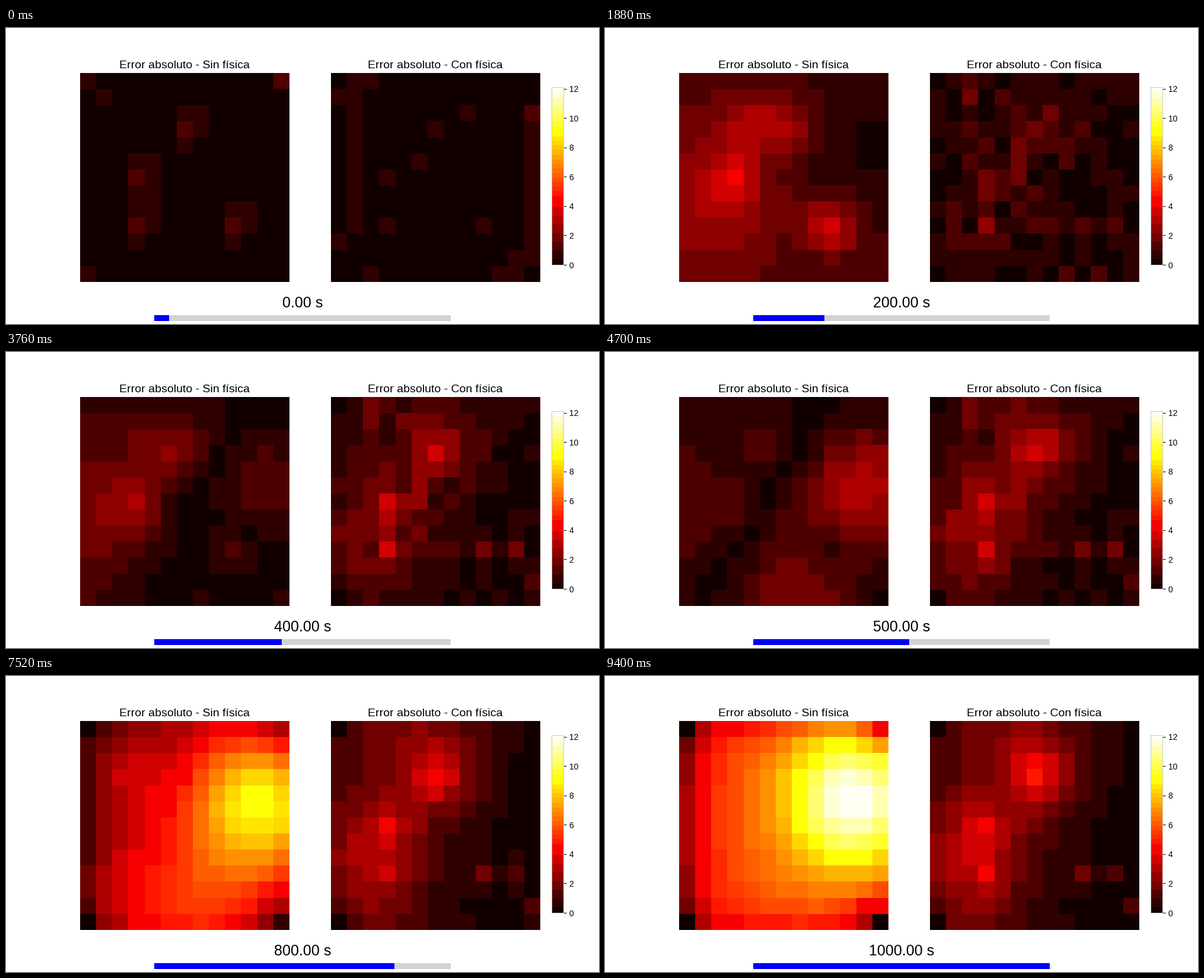
These frames come from a looping animation (1000 px wide and 500 px high, 9.87 s). A matplotlib script:

```python
import numpy as np
import matplotlib.pyplot as plt
from matplotlib.animation import FuncAnimation
from matplotlib.colors import BoundaryNorm, ListedColormap

plt.rcParams["font.family"] = "Liberation Sans"

N = 13
FRAMES = 21
V_MAX = 12.12
WEAK, STRONG = 0.7, 1.3
X, Y = np.meshgrid(np.arange(N), np.arange(N))


def lobe(c, r, sx, sy=None):
    """Gaussian of height 1 centred on column c, row r."""
    sy = sy or sx
    return np.exp(-((X - c) / sx) ** 2 / 2 - ((Y - r) / sy) ** 2 / 2)


def corner(c, r, reach):
    return np.exp(-np.hypot(X - c, Y - r) / reach)


def mix(a, b, w):
    return (1 - w) * a + w * b


# Without physics: slight errors, then too cold, then ever too hot
def start_left():
    out = np.full((N, N), 0.1)
    for c, r, h in ((6, 2, 2), (3, 5, 5), (9, 8, 2)):
        out[r:r + h, c:c + 2] = WEAK
        out[r + h, c] = WEAK
        out[[r + 1, r + h - 1], c] = STRONG
    out[[0, 1, 12], [0, 1, 0]] = WEAK
    out[0, 12] = STRONG
    return -out


start = start_left()
cold = -(1 + 1.9 * lobe(1.5, 7.5, 3, 3.5) + 1.9 * lobe(5.2, 2.7, 2.2, 1.2)
         + 1.7 * lobe(3, 6, 1) + 2.5 * lobe(9, 9, 1.2)
         - 0.8 * lobe(11, 4, 2.5, 3))
warm = (6 * lobe(11, 5, 3.8, 3) + 4.9 * lobe(6.5, 11.5, 4, 3)
        + 1.2 * lobe(2.5, 3, 1.3) - 0.9 * lobe(5.5, 2.5, 1.5)
        - 0.9 * lobe(0, 6, 1, 2.5)
        - 1.1 * corner(0, 12, 0.6) - 1.5 * corner(12, 12, 1))
hot = (6.2 * (1 - 0.55 * np.exp(-X / 1.5)) + 6.1 * lobe(10.3, 4.2, 2.83, 3.2)
       - 1.2 * (np.exp(-Y) + np.exp(Y - 12.0))
       - 1.5 * (corner(0, 0, 0.6) + corner(0, 12, 0.6))
       - 3 * corner(12, 0, 1.3) - 5 * corner(12, 12, 1.3))


def left(t):
    if t < 200:
        return mix(start, cold, t / 200)
    if t < 650:
        return mix(cold, warm, ((t - 200) / 450) ** 1.7)
    return mix(warm, hot, ((t - 650) / 350) ** 0.8)


# With physics: a ridge that saturates, a few fixed hot cells, fading noise
def start_right():
    out = np.full((N, N), 0.1)
    out[:10, 1] = out[3:12, 12] = out[12, 10:12] = out[11, 11] = WEAK
    out[12, 12] = 0.1
    out[[0, 1, 10, 12, 6, 9, 5, 3, 2, 9],
        [2, 0, 0, 2, 3, 3, 5, 6, 8, 9]] = WEAK
    out[2, 12] = STRONG
    return out


first = start_right()
noise = np.random.default_rng(4).normal(0, 0.45, (N, N))
ridge = (3.2 * lobe(2.2, 7.5, 2.6, 3.2) + 2.6 * lobe(6.3, 2.5, 2)
         + 1.2 * lobe(3, 0, 4, 1.5) + 0.6 * lobe(2, 12, 2, 1)
         - 0.9 * (corner(0, 0, 0.5) + 1.6 * corner(0, 12, 0.5)))
spots = (1.7 * lobe(6, 3, 0.8) + 1.5 * lobe(3, 6, 0.6) + lobe(3, 9, 0.6)
         + 1.5 * lobe(9, 9, 0.5) + 1.2 * lobe(11, 9, 0.4)
         + 0.9 * lobe(12, 11, 0.4))


def rise(t):
    return 1 - np.exp(-(t / 480) ** 1.4)


def right(t):
    s = t / 200
    field = (0.2 + ridge * rise(t) / rise(1000) + spots * min(s / 2, 1)
             + noise * s * np.exp(1 - s))
    return mix(first, field, min(s, 1))


# Stepped heat colours
edges = np.concatenate([[0], [0.35], np.linspace(0.98, 3.905, 6),
                        np.linspace(4.7, 8.77, 14),
                        np.linspace(9.41, 11.8, 7), [V_MAX]])
mids = (edges[:-1] + edges[1:]) / 2
cmap = ListedColormap(plt.get_cmap("hot")(mids / V_MAX))
norm = BoundaryNorm(edges, len(mids))

fig = plt.figure(figsize=(10, 5), dpi=100, facecolor="white")
SIDE = 0.775 / 2.2


def panel(x, title):
    ax = fig.add_axes([x, 0.495 - SIDE, SIDE, 2 * SIDE])
    ax.set_title(title, fontsize=14)
    ax.axis("off")
    return ax.imshow(np.zeros((N, N)), cmap=cmap, norm=norm,
                     interpolation="nearest", aspect="auto")


maps = [(panel(0.125, "Error absoluto - Sin física"), left),
        (panel(0.9 - SIDE, "Error absoluto - Con física"), right)]

cax = fig.add_axes([0.92, 0.2, 0.02, 0.6])
cax.pcolormesh([0, 1], edges, mids[:, None], cmap=cmap, norm=norm)
cax.set_ylim(0, V_MAX)
cax.set_xticks([])
cax.yaxis.tick_right()
cax.set_yticks(range(0, 13, 2))
cax.tick_params(labelsize=10)
for spine in cax.spines.values():
    spine.set(color="0.8", linewidth=0.8)

clock = fig.text(0.5, 28 / 500, "", fontsize=18, ha="center", va="baseline")

bar_ax = fig.add_axes([0.25, 0.01, 0.5, 0.02])
bar_ax.set(xlim=(0, 1), ylim=(0, 1))
bar_ax.axis("off")
bar_ax.add_patch(plt.Rectangle((0, 0), 1, 1, color="lightgray", lw=0))
progress = bar_ax.add_patch(plt.Rectangle((0, 0), 0, 1, color="blue", lw=0))


def update(i):
    t = 50 * i
    for image, error in maps:
        image.set_data(np.clip(np.abs(error(t)), 0, V_MAX - 0.01))
    clock.set_text(f"{t:.2f} s")
    progress.set_width(0.05 + 0.95 * i / (FRAMES - 1))
    return [image for image, _ in maps] + [clock, progress]


anim = FuncAnimation(fig, update, frames=FRAMES, interval=470, repeat=True)
plt.show()
```
